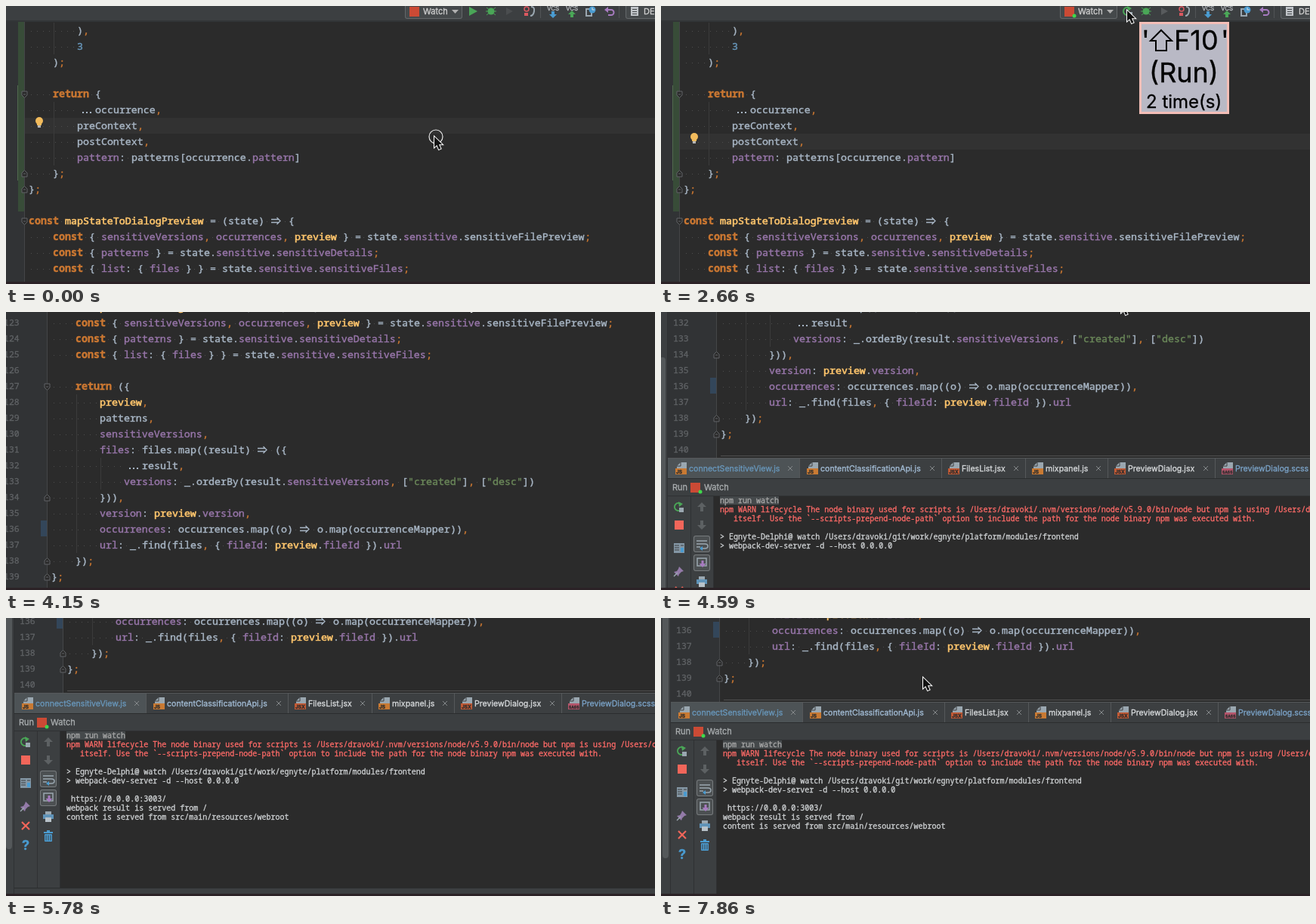
An HTML page with a canvas that plays this animation: 859x368 px, repeating every 8000 ms.

```html
<!DOCTYPE html>
<html lang="en">
<head>
<meta charset="utf-8">
<title>Run watch task</title>
<style>
html, body { margin: 0; height: 100%; overflow: hidden; background: #2b2b2b; }
canvas { display: block; }
</style>
</head>
<body>
<canvas id="stage" width="859" height="368"></canvas>
<script>
const ctx = document.getElementById('stage').getContext('2d');
const LOOP = 8000, TICK = 148;
const ROW = 21, TOP = 22, COL = 8, LEFT = 30;
const UI = 'Inter, sans-serif';
const MONO = '"Noto Sans Mono", monospace';
const PANEL = '#3c3f41', EDITOR = '#2b2b2b', GUTTER = '#313335', BORDER = '#55585a';
const GREEN = '#4aa657', RED = '#db5860', NPM = '#cb4a35', GREY = '#9aa7b0', BLUE = '#4a9bd0', PURPLE = '#9876aa';

const code = `        ),
        3
    );

    return {
        ...occurrence,
        preContext,
        postContext,
        pattern: patterns[occurrence.pattern]
    };
};

const mapStateToDialogPreview = (state) => {
    const { sensitiveVersions, occurrences, preview } = state.sensitive.sensitiveFilePreview;
    const { patterns } = state.sensitive.sensitiveDetails;
    const { list: { files } } = state.sensitive.sensitiveFiles;

    return ({
        preview,
        patterns,
        sensitiveVersions,
        files: files.map((result) => ({
            ...result,
            versions: _.orderBy(result.sensitiveVersions, ["created"], ["desc"])
        })),
        version: preview.version,
        occurrences: occurrences.map((o) => o.map(occurrenceMapper)),
        url: _.find(files, { fileId: preview.fileId }).url
    });
};
`.split('\n');

const syntax = new RegExp([
  /(?<key>\b(?:const|return)\b)/, /(?<str>"\w+")/, /(?<num>\b\d+)/, /(?<sep>[,;])/,
  /(?<fn>\b(?:mapStateToDialogPreview|preview)\b)/,
  /(?<prop>\w+(?=:)|(?<=\.)(?:sensitive(?!FileP)\w*|pattern|version|fileId|url)\b|sensitiveVersions|(?:patterns|files)(?= })|occurrences(?=, ))/,
  /(?<dots>\.{3})/, /(?<arrow>=>)/, /\w+/, /\S/
].map(r => r.source).join('|'), 'g');
const colors = { key: '#cc7832', str: '#6a8759', num: '#6897bb', sep: '#cc7832', fn: '#ffc66d', prop: PURPLE };
const PLAIN = '#a9b7c6';

function box(color, x, y, w, h, r = 0) {
  ctx.fillStyle = color;
  ctx.beginPath();
  ctx.roundRect(x, y, w, h, r);
  ctx.fill();
}

// The thin outline gives the text a slightly heavier weight.
function text(str, x, y, color, font, outline = 0.3) {
  ctx.fillStyle = ctx.strokeStyle = color;
  ctx.font = font;
  ctx.lineWidth = outline;
  ctx.fillText(str, x, y);
  ctx.strokeText(str, x, y);
}

// Filled path, or an outline when a line width is given.
function shape(d, x, y, color, width) {
  ctx.save();
  ctx.translate(x, y);
  const path = new Path2D(d);
  ctx.fillStyle = ctx.strokeStyle = color;
  ctx.lineWidth = width;
  width ? ctx.stroke(path) : ctx.fill(path);
  ctx.restore();
}

const circle = r => `M${-r} 0a${r} ${r} 0 1 0 ${2 * r} 0a${r} ${r} 0 1 0 ${-2 * r} 0`;

// Keys are [tick, x, y]; values between them are linear unless eased.
function along(keys, tick, ease = u => u) {
  let i = 0;
  while (i < keys.length - 2 && tick >= keys[i + 1][0]) i++;
  const [a, b] = [keys[i], keys[i + 1]];
  const u = ease(Math.min(1, Math.max(0, (tick - a[0]) / (b[0] - a[0]))), i);
  return [1, 2].map(n => Math.round(a[n] + (b[n] - a[n]) * u));
}

const pan = [[24, 0, 0], [31, 49, -480], [35, 55, -532], [39, 51, -574], [47, 51, -574], [50, 53, -562]];
const panEase = (u, i) => i ? u : u * u * (3 - 2 * u);
const pointer = [[5, 567, 173], [10, 616, 25], [12, 617, 6], [20, 617, 6], [23, 612, -22], [24, 612, -22],
  [31, 609, -13], [35, 611, -12], [39, 610, -22], [47, 610, -22], [48, 610, -13], [50, 600, -5], [53, 347, 79]];

function codeRow(line, i) {
  const y = TOP + i * ROW, base = y + 15, indent = line.search(/\S/);
  text(110 + i, -33, base - 1, '#606366', `11.5px ${MONO}`);
  for (let c = 4; c < indent; c += 4) box('#3b3b3b', LEFT + c * COL + 1, y, 1, ROW);
  for (let c = 0; c < line.length; c++)
    if (line[c] === ' ') box('#4d4d4d', LEFT + c * COL + 3, base - 4, 1, 1);
  for (const m of line.matchAll(syntax)) {
    const x = LEFT + m.index * COL, g = m.groups;
    const kind = Object.keys(g).find(k => g[k]);
    if (kind === 'dots') for (const n of [0, 1, 2]) box(PLAIN, x + 7 + n * 5, base - 2, 2, 2);
    else if (kind === 'arrow') shape('M1 -2h10M1 2h10M8.5 -4.5l4.5 4.5l-4.5 4.5', x, base - 4.5, PLAIN, 1.3);
    else text(m[0], x, base, colors[kind] || PLAIN, `${kind === 'key' ? 'bold ' : ''}13.3px ${MONO}`, kind === 'fn' ? 0.6 : 0.4);
  }
}

function foldMark(i, up) {
  const d = up ? 'M-3.5 4v-5l3.5 -3.5l3.5 3.5v5z' : 'M-3.5 -4v5l3.5 3.5l3.5 -3.5v-5z';
  shape(d, 24.5, TOP + i * ROW + 11, EDITOR);
  shape(d + 'M-1.5 0h3', 24.5, TOP + i * ROW + 11, '#606366', 1);
}

function bulb(y) {
  shape(circle(5), 44, y, '#f2bb5c');
  box('#f2bb5c', 41, y + 3, 6, 3);
  box('#b5b5b5', 42, y + 6, 4, 3);
}

function editor(tick) {
  const row = tick < 5 ? 6 : 7, caretY = TOP + row * ROW;
  box(EDITOR, -40, 0, 1000, 674);
  box(GUTTER, -40, 0, 64, 674);
  box('#323232', 25, caretY, 900, ROW);
  box('#384c38', 16, 20, 8, 252);
  box('#50684f', 15, 105, 1, 126);
  box('#33465a', 16, 567, 8, 21);
  box('#444648', 24, 20, 1, 654);
  code.forEach(codeRow);
  [4, 12, 17].forEach(i => foldMark(i));
  [9, 10, 24, 28, 29].forEach(i => foldMark(i, true));
  if (tick < 5 || tick >= 13 && tick < 21) bulb(caretY + 4);
  if (tick >= 5 && tick < 18 && tick % 6 > 2) box('#d0d0d0', 189, caretY + 2, 2, 17);
  box('#505050', 30, 670, 900, 1);
}

function rerun(x, y) {
  shape('M3 -4A5 5 0 1 0 3 4', x, y, GREEN, 2);
  shape('M0 -7l6 3l-5 4z', x, y, GREEN);
  box(GREY, x + 1, y + 1, 6, 6);
}

function taskIcon(x, y, running) {
  box(NPM, x, y, 13, 13);
  if (running) shape(circle(2.5), x + 13, y + 12, '#3fd84c');
}

function toolbar(tick) {
  const running = tick >= 17;
  box(PANEL, 0, 0, 900, 20);
  box('#323537', 0, 19, 900, 2);
  box('#64686a', 528, -5, 76, 22, 3);
  box('#45494b', 529, -5, 74, 21, 2);
  taskIcon(534, 1, running);
  text('Watch', 552, 11, '#d0d0d0', `11px ${UI}`);
  shape('M0 0h9l-4.5 5z', 590, 5, '#b0b0b0');
  if (running) rerun(617, 7);
  else shape('M0 0l11 6l-11 6z', 613, 1, GREEN);
  shape('M-6 -5l12 10M-6 5l12 -10M-7 0h14', 642, 7, GREEN, 1);
  shape(circle(4.5), 642, 7, GREEN);
  shape('M-4 -5l9 5l-9 5z', 666, 7, running ? '#585b5d' : '#4a4d4f');
  shape('M3 -6q5 0 4 6t-5 6', 692, 7, GREY, 2);
  shape(circle(3), 689, 4, RED, 1.5);
  box(RED, 686, 9, 5, 4);
  box('#515456', 707, 0, 1, 16);
  for (const [x, color, dir] of [[724, BLUE, 1], [749, GREEN, -1]]) {
    text('VCS', x - 8, 6, '#b8bcc0', `8px ${UI}`);
    shape(`M-2 ${-4 * dir}h4v${4 * dir}h3l-5 ${5 * dir}l-5 ${-5 * dir}h3z`, x, 11, color);
  }
  box(GREY, 767, 3, 9, 11);
  box(PANEL, 769, 5, 5, 7);
  shape(circle(4.5), 776, 5, BLUE);
  shape('M0 -3v3h3', 776, 5, '#ddd', 1);
  shape('M-4 -2h6a3.5 3.5 0 0 1 0 7h-4', 799, 7, '#a77bc0', 2);
  shape('M-7 -2l5 -4v8z', 799, 7, '#a77bc0');
  box('#515456', 811, 0, 1, 16);
  box('#64686a', 820, -5, 60, 22, 3);
  box('#45494b', 821, -5, 60, 21, 2);
  box(tick >= 21 ? '#8fb8d8' : '#c0c4c8', 827, 1, 10, 12);
  shape('M0 0h6M0 3h6M0 6h6', 829, 4.5, '#45494b', 1);
  text('DE', 844, 11, '#d0d0d0', `11px ${UI}`);
}

function popup() {
  box('#f3beb7', 633, 21, 119, 122);
  box('#b9b9c5', 636, 24, 113, 116);
  text("'", 636, 58, '#000', `36px ${UI}`);
  text("'", 741, 58, '#000', `36px ${UI}`);
  shape('M0 -14l14 14h-7v13h-14v-13h-7z', 662, 46, '#000', 2);
  text('F10', 679, 58, '#000', `36px ${UI}`);
  text('(Run)', 646, 101, '#000', `36px ${UI}`);
  text('2 time(s)', 642, 135, '#000', `24px ${UI}`);
}

const tabs = [
  ['connectSensitiveView.js', 43, 189, 'JS', '#6897bb'],
  ['contentClassificationApi.js', 217, 377, 'JS', '#a3bdd6'],
  ['FilesList.jsx', 404, 488, 'JSX', '#d8dbdd'],
  ['mixpanel.js', 515, 597, 'JS', '#d8dbdd'],
  ['PreviewDialog.jsx', 624, 739, 'JSX', '#d8dbdd'],
  ['PreviewDialog.scss', 766, 900, 'SASS', '#7ba3c8']
];
const labelColors = { JS: '#c97a33', JSX: '#c25a35', SASS: '#b5556b' };

function fileTab([name, x, end, type, color]) {
  shape('M0 5l5 -5h8v16h-13z', x - 16, 147, GREY);
  shape('M0 5h5v-5', x - 16, 147, PANEL, 1);
  box(labelColors[type], x - 18, 155, 15, 8);
  text(type, x - 17, 162, '#2b2b2b', `bold ${type === 'SASS' ? 5 : 6.5}px ${UI}`);
  text(name, x, 159, color, `10.6px ${UI}`);
  shape('M-3 -3l6 6M3 -3l-6 6', end - 12, 155, '#85898b', 1);
  box(BORDER, end, 141, 1, 27);
}

const USER = '/Users/dravoki';
const output = [
  ['npm run watch', '#a8a8a8'],
  [`npm WARN lifecycle The node binary used for scripts is ${USER}/.nvm/versions/node/v5.9.0/bin/node but npm is using ${USER}`, '#ff6b68'],
  ['itself. Use the `--scripts-prepend-node-path` option to include the path for the node binary npm was executed with.', '#ff6b68', 18],
  [''],
  [`> Egnyte-Delphi@ watch ${USER}/git/work/egnyte/platform/modules/frontend`],
  ['> webpack-dev-server -d --host 0.0.0.0'],
  [''],
  [' https://0.0.0.0:3003/'],
  ['webpack result is served from /'],
  ['content is served from src/main/resources/webroot']
];

function runButtons() {
  rerun(29, 206);
  box('#f2665a', 24, 224, 12, 12);
  box('#8497a5', 23, 254, 14, 13);
  shape('M0 0h6M0 3h6M0 6h6M8 0h4', 24, 257, PANEL, 1.2);
  box(BLUE, 32, 260, 4, 6);
  shape('M0 -6l6 6l-3 1l-3 3l-1 3l-6 -6l4 -1l2 -3z', 30, 291, '#937aa8');
  shape('M-2 2l-5 5', 30, 291, GREY, 1.5);
  shape('M-5 -5l10 10M5 -5l-10 10', 30, 317, '#f2665a', 2.2);
  text('?', 25, 349, BLUE, `bold 18px ${UI}`);
  for (const [y, s] of [[206, 1], [230, -1]])
    shape(`M0 ${-6 * s}l6 ${6 * s}h-4v${6 * s}h-4v${-6 * s}h-4z`, 60, y, '#5d6163');
  for (const y of [244, 269]) {
    box('#777b7d', 49, y, 22, 22, 3);
    box('#4c5052', 50, y + 1, 20, 20, 2);
  }
  shape('M-7 -4h14M-7 0h11q4 0 4 3t-4 3h-4M-7 4h5', 60, 255, GREY, 1.5);
  shape('M0 3l4 -3v6z', 57, 258, BLUE);
  shape('M-6 -6h12v10h-12z', 60, 280, GREY, 1.5);
  shape('M-1.5 -4h3v4h3l-4.5 5l-4.5 -5h3z', 61, 281, '#a77bc0');
  box(GREY, 56, 298, 8, 4);
  box('#5f93b8', 53, 302, 14, 6);
  box('#b8c2c9', 56, 306, 8, 6);
  box(BLUE, 54, 325, 12, 2);
  box(BLUE, 58, 323, 4, 2);
  box(BLUE, 55, 328, 10, 10, 1);
  shape('M0 0v7M3 0v7M6 0v7', 57, 329.5, PANEL, 1);
}

function runWindow(tick) {
  box(PANEL, -60, -520, 75, 1000);
  box('#54585a', 4, 8, 8, 340, 4);
  box('#2f3133', 14, -520, 1, 1000);
  box(PANEL, 15, 141, 900, 300);
  box('#4d5356', 15, 141, 174, 27);
  box(BORDER, 15, 141, 900, 1);
  tabs.forEach(fileTab);
  box('#2b2d2e', 15, 168, 900, 1);
  text('Run', 21, 184, '#a9adaf', `11px ${UI}`);
  taskIcon(45, 174, true);
  text('Watch', 63, 184, '#a9adaf', `11px ${UI}`);
  box('#2f3133', 15, 191, 900, 1);
  box(EDITOR, 76, 192, 900, 207);
  box('#2f3133', 45, 192, 1, 207);
  box('#2f3133', 75, 192, 1, 207);
  box('#2b2d2e', 15, 399, 900, 1);
  runButtons();
  box('#45494b', 84, 192, 78, 11);
  output.slice(0, tick < 37 ? 6 : 10).forEach(([str, color = '#d0d3d5', indent = 0], i) =>
    text(str, 84 + indent, 201 + i * 12, color, `10.03px ${MONO}`));
}

function cursor(tick) {
  const [x, y] = along(pointer, tick);
  if (tick === 0 || tick === 15) shape(circle(9), x + 2, y, '#e8e8e8', 1.2);
  if (tick > 5 && tick < 11) {
    const beam = 'M-3 -8q3 0 3 2v12q0 2 -3 2M3 -8q-3 0 -3 2v12q0 2 3 2M-2 3h4';
    shape(beam, x + 0.5, y, '#222', 3);
    shape(beam, x + 0.5, y, '#eee', 1.2);
  } else {
    const arrow = 'M0 0v14l3.3 -3l2.6 6l2.6 -1.2l-2.6 -5.6h4.6z';
    shape(arrow, x, y, '#fff', 2);
    shape(arrow, x, y, '#111');
  }
}

function draw() {
  const tick = Math.floor((performance.now() % LOOP + 15) / TICK);
  ctx.save();
  ctx.translate(...along(pan, tick, panEase));
  editor(tick);
  toolbar(tick);
  if (tick >= 17) popup();
  ctx.translate(-55, 532);
  runWindow(tick);
  ctx.restore();
  box('#2b2226', 0, 365, 859, 3);
  cursor(tick);
  requestAnimationFrame(draw);
}
draw();
</script>
</body>
</html>
```
